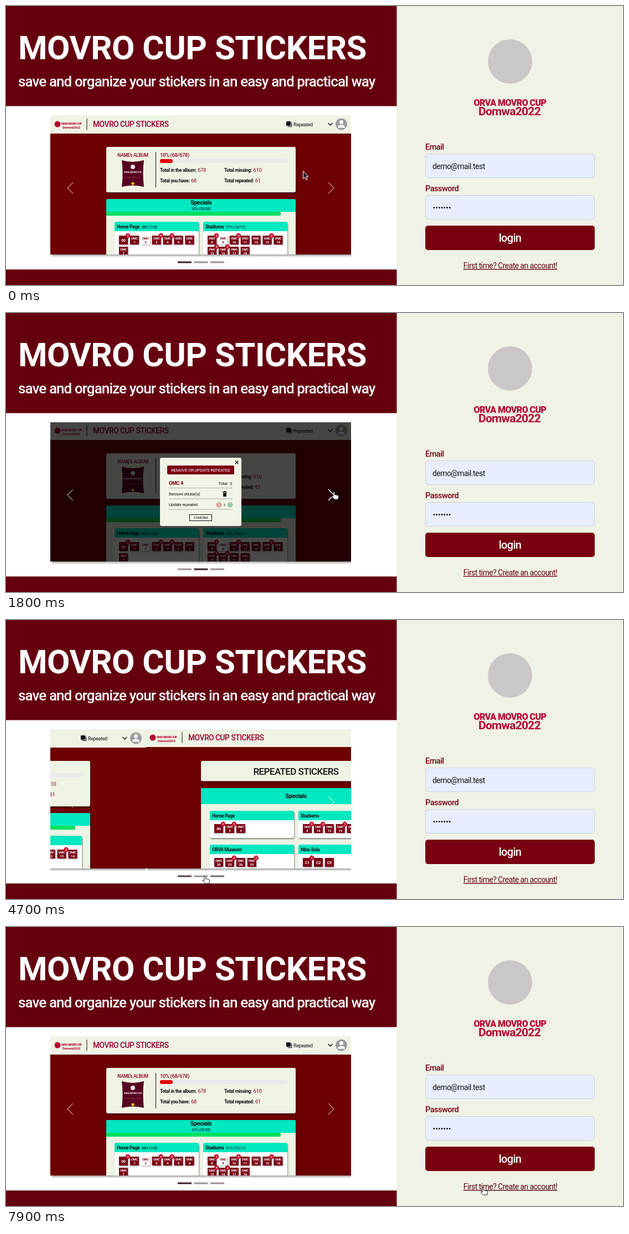
Write an HTML page that moves like this. It is 1114x503 px and loops after 8000 ms.

```html
<!DOCTYPE html>
<html lang="en">
<head>
<meta charset="utf-8">
<title>Sticker album login</title>
<style>
  html, body { margin: 0; width: 100%; height: 100%; overflow: hidden; background: #f0f2e6; }
  svg { display: block; }
  text { font-family: Roboto, "Open Sans", sans-serif; letter-spacing: -.035em; white-space: pre; }
  .card { filter: drop-shadow(1px 2px 1px rgba(0, 0, 0, .45)); }
  .low { filter: drop-shadow(1px 1px 1px rgba(0, 0, 0, .4)); }
</style>
</head>
<body>
<svg id="stage" width="1114" height="503" viewBox="0 0 1114 503"></svg>
<script>
const LOOP = 8000, WIDTH = 543;
const WINE = '#65000f', BODY = '#6d0000', CREAM = '#eef3e4', TEAL = '#00e8c0',
      ROSE = '#8e0026', LOGO = '#b8002e', STICKER = '#7a0014', BUTTON = '#780010';
const BRAND = 'MOVRO CUP STICKERS';

// Drawing helpers, all returning SVG markup
const text = (x, y, s, size, fill = '#111', weight = 400, anchor = 'start', extra = '') =>
  `<text x="${x}" y="${y}" font-size="${size}" fill="${fill}" font-weight="${weight}" text-anchor="${anchor}" ${extra}>${s}</text>`;
const mid = (x, y, s, size, fill, weight, extra) => text(x, y, s, size, fill, weight, 'middle', extra);
const rect = (x, y, w, h, fill, r = 0, extra = '') =>
  `<rect x="${x}" y="${y}" width="${w}" height="${h}" fill="${fill}" rx="${r}" ${extra}/>`;
const circle = (x, y, r, fill, extra = '') => `<circle cx="${x}" cy="${y}" r="${r}" fill="${fill}" ${extra}/>`;
const line = (d, stroke = '#111', w = 1, extra = '') =>
  `<path d="${d}" fill="none" stroke="${stroke}" stroke-width="${w}" ${extra}/>`;
const group = (id, body) => `<g id="${id}">${body}</g>`;
const clip = (h, body) =>
  `<svg x="80" y="197" width="${WIDTH}" height="${h}" viewBox="80 197 ${WIDTH} ${h}">${body}</svg>`;

function header() {
  return rect(80, 197, WIDTH, 251, BODY) + rect(80, 197, WIDTH, 33, CREAM) +
    circle(93, 213, 5.5, LOGO) +
    text(100, 214, 'ORVA MOVRO CUP', 4.5, LOGO, 800) +
    text(102, 221, 'Domwa2022', 6, LOGO, 700) +
    line('M146 203V223') + text(157, 218, BRAND, 13.8, '#9c002c', 500) +
    rect(506, 208, 8, 8, '#111', 1) + line('M508.5 217.5H515.5V210', '#111', 1.2) +
    text(519, 217, 'Repeated', 8.9) + line('M581.5 211L585.5 215L589.5 211', '#111', 1.4) +
    circle(605.5, 213, 10.5, '#9c9a9f') + circle(605.5, 209.5, 3.4, '#fff') +
    '<path d="M599 219.5Q599 214.5 605.5 214.5T612 219.5Z" fill="#fff"/>';
}

function sticker(cx, y, label, badge, missing) {
  const ink = missing ? STICKER : '#fff';
  const word = isNaN(label) || label === '00'
    ? mid(cx, y + 10.5, label, 7, ink, 700)
    : mid(cx, y + 7, 'OMC', 5.6, ink, 700) + mid(cx, y + 14, label, 6.2, ink, 700);
  return rect(cx - 8, y, 16, 16, missing ? '#fff' : STICKER, 0, 'class="low"') + word +
    (badge ? circle(cx + 8, y, 4.4, '#c8102e') + mid(cx + 8, y + 2, badge, 5.5, '#fff', 500) : '');
}

// Items read "label", "label:badge" or "label-" when missing; seven to a row
function panel(x, y, h, title, note, items) {
  const cells = items.split(' ').map((item, i) => {
    const [label, badge] = item.replace('-', '').split(':');
    return sticker(x + 16 + i % 7 * 19.9, y + 25 + (i / 7 | 0) * 20 - (h < 50 ? 1 : 0), label, badge, item.endsWith('-'));
  });
  return `<g class="card">${rect(x, y, 152, h, '#fff', 3)}</g>` +
    `<path d="M${x} ${y + 17}V${y + 3}q0 -3 3 -3H${x + 149}q3 0 3 3V${y + 17}Z" fill="${TEAL}"/>` +
    `<text x="${x + 4}" y="${y + 12}" font-size="8.4" font-weight="700" fill="#111">${title}` +
    `<tspan dx="4" font-size="7" font-weight="400">${note}</tspan></text>` + cells.join('');
}

const stat = (x, y, label, n) =>
  `<text x="${x}" y="${y}" font-size="8.6" font-weight="700" fill="#111">${label}` +
  `<tspan dx="2.5" font-size="9.4" font-weight="400" fill="${ROSE}">${n}</tspan></text>`;

function home() {
  return header() +
    rect(181, 254, 342, 82, CREAM, 3, 'class="card"') +
    mid(229, 272, 'NAME’s ALBUM', 8.35, ROSE, 500) +
    '<path d="M209 278Q229 284 249 278Q246 302 249 326Q229 321 209 326Q212 302 209 278Z" fill="#560322"/>' +
    circle(229, 290, 4, '#e8dfe2') + mid(229, 301, 'ORVA MOVRO CUP', 4, '#fff', 700) +
    line('M214 309H244', '#9a3a52') + circle(229, 320, 2.6, '#f0d000') +
    line('M270.5 263V327') +
    text(278, 272, '10% (68/678)', 9.4, ROSE, 500) +
    rect(278, 276, 230, 7, '#e7e9ec', 3) + rect(278, 276, 23, 7, '#e30505', 3) +
    stat(278, 299, 'Total in the album:', 678) + stat(394, 299, 'Total missing:', 610) +
    stat(278, 318, 'Total you have:', 68) + stat(394, 318, 'Total repeated:', 61) +
    rect(181, 348, 342, 110, CREAM, 3, 'class="card"') +
    `<path d="M181 371V351q0 -3 3 -3H520q3 0 3 3V371Z" fill="${TEAL}"/>` +
    rect(181, 371, 315, 7, '#00e060', 2) +
    mid(352, 358, 'Specials', 10.8, '#111', 700) + mid(352, 368, '92% (35/38)', 6.7) +
    panel(196, 389, 70, 'Home Page', '88% (7/8)', '00:3 1 2- 3:4 4:2 5 6 7') +
    panel(356, 389, 70, 'Stadiums', '91% (10/11)', '8:3 9- 10:4 11 12 13:2 14 15:4 16:2 17 18');
}

function dialog() {
  const red = '#c8102e', green = '#0a8a3a', rule = y => line(`M294 ${y}H409`, '#999', .8);
  return `<g transform="translate(0 -1)">${home()}</g>` +
    rect(80, 197, WIDTH, 251, '#000', 0, 'opacity=".71"') +
    rect(278, 261, 147, 123, '#f1f4e6', 3) +
    line('M414 266.5L419.5 272M419.5 266.5L414 272', '#111', 1.4) +
    rect(291, 275, 121, 16, STICKER, 2) + mid(351.5, 286, 'REMOVE OR UPDATE REPEATED', 7.85, '#fff') +
    text(294, 310, 'OMC 4', 9, STICKER, 700) + text(408, 309.5, 'Total:  3', 7.6, '#111', 400, 'end') + rule(315.5) +
    text(294, 328.5, 'Remove sticker(s)', 7.6) +
    '<path d="M391 322h2.5v-1h3v1h2.5v1.5h-8zM391.8 324.5h6.4l-.5 6.5h-5.4z" fill="#111"/>' + rule(335) +
    text(294, 348, 'Update repeated', 7.6) +
    circle(384.5, 346, 3.8, 'none', `stroke="${red}"`) + line('M382.5 346H386.5', red) +
    mid(394.5, 349, '1', 8) +
    circle(404.5, 346, 3.8, 'none', `stroke="${green}"`) + line('M402.5 346H406.5M404.5 344V348', green) +
    rule(354) + rect(331.5, 363.5, 40, 11, 'none', 0, 'stroke="#111"') + mid(351.5, 371.3, 'CONFIRM', 6.2);
}

function repeated() {
  return `<g transform="translate(0 -1)">${header()}</g>` +
    rect(180, 254, 343, 36.5, CREAM, 3, 'class="card"') + mid(351.5, 279, 'REPEATED STICKERS', 17, '#111', 500) +
    rect(180, 303, 343, 155, CREAM, 3, 'class="card"') +
    `<path d="M180 332V306q0 -3 3 -3H520q3 0 3 3V332Z" fill="${TEAL}"/>` +
    mid(351.5, 321, 'Specials', 10.8, '#111', 700) +
    panel(196, 344, 49, 'Home Page', '', '00:2 3:3 4') +
    panel(356, 344, 49, 'Stadiums', '', '8:2 10:3 13 15:1 16') +
    panel(196, 405, 49, 'ORVA Museum', '', '20 25:3 26 29:2') +
    panel(356, 405, 49, 'Mira-Sola', '', 'C1:1 C2 C5');
}

// A slide carries its own shadow along its lower edge
const slide = (draw, i) => group('slide' + i,
  rect(83, 448, 540, 5, 'url(#fade)') + clip(251, rect(80, 197, WIDTH, 251, BODY) + draw()));

const box = (y, fill) => rect(757.5, y + .5, 305, 43, fill, 5, 'stroke="#cdd2da"');
const hint = (y, s) => text(770, y + 28, s, 17.2, '#d6d6d8');
const field = (y, label, placeholder) =>
  text(757, y - 7, label, 14.5, '#780014', 500) + box(y, '#fff') + hint(y, placeholder);
const button = (y, s) => rect(757, y, 306, 44, BUTTON, 5) + mid(910, y + 29, s, 20, '#fff', 500);
const link = (y, s) => mid(910.5, y, s, 13.85, '#680010', 400, 'class="link" text-decoration="underline"');

// Browser autofill over the email and password boxes
function filled(emailY, passY) {
  let dots = '';
  for (let i = 0; i < 7; i++) dots += circle(773 + i * 4.7, passY + 22.5, 1.5, '#111');
  return `<g class="filled">${box(emailY, '#e8eeff')}${text(770, emailY + 27.5, 'demo@mail.test', 13.9)}` +
    `${box(passY, '#e8eeff')}${dots}</g>`;
}

const login = circle(910, 100, 40, '#cbc7c7') +
  mid(910, 180, 'ORVA MOVRO CUP', 16, LOGO, 800) + mid(909, 197, 'Domwa2022', 21, LOGO, 700) +
  field(266, 'Email', 'email') + field(341, 'Password', 'password') + filled(266, 341) +
  button(396, 'login') + link(473, 'First time? Create an account!');

const signup = field(43, 'Username', 'username') + field(119, 'Email', 'email') +
  field(194, 'Password', 'password') + filled(119, 194) +
  field(269, 'Confirm password', 'confirm password') + field(344, 'Picture url (optional)', 'picture url') +
  button(399, 'sign up') + link(476, 'already have an account? go to login');

const stage = document.getElementById('stage');
stage.innerHTML =
  '<linearGradient id="fade" x2="0" y2="1"><stop stop-opacity=".38"/><stop offset="1" stop-opacity="0"/></linearGradient>' +
  rect(0, 0, 706, 503, WINE) + rect(0, 180.5, 706, 294.5, '#fff') + rect(705.5, 0, 408.5, 503, '#f0f2e6') +
  text(22, 95.5, BRAND, 60, '#fff', 700, 'start', 'style="letter-spacing:-.008em"') +
  text(22, 145, 'save and organize your stickers in an easy and practical way', 26, '#fff', 500) +
  clip(257, [home, dialog, repeated].map(slide).join('')) +
  line('M121 318L111 328L121 338', '#fff', 1.5, 'opacity=".5"') +
  line('M582 318L592 328L582 338', '#fff', 1.5, 'id="next"') +
  [310, 339.5, 369].map((x, i) => rect(x, 460.5, 25, 3, '#3c2029', 0, `id="mark${i}"`)).join('') +
  group('login', login) + group('signup', signup) +
  group('arrow', '<path d="M.5 .5V14.5L3.6 11.6L5.8 16.5L8.2 15.5L6 10.8H10Z" fill="#222" stroke="#fff"/>') +
  group('hand', '<path d="M4 1.7a1.3 1.3 0 0 1 2.6 0V5.5L12 6.7Q13.7 7.2 13.5 9L12.6 14H5.8L1 8.8Q1.6 6.9 4 8.5Z" fill="#fff" stroke="#222"/>');

const $ = id => document.getElementById(id);
const links = stage.querySelectorAll('.link'), fills = stage.querySelectorAll('.filled');
const show = (el, on) => el.setAttribute('visibility', on ? 'visible' : 'hidden');

// Pointer track: time, x, y, hand
const pointer = [
  [0, 536, 297, 0], [100, 562, 345, 0], [200, 608, 430, 0], [300, 603, 375, 0], [400, 588, 322, 0],
  [600, 587, 322, 1], [3700, 581, 341, 1], [3800, 540, 378, 0], [3900, 462, 421, 0],
  [4000, 385, 447, 0], [4100, 330, 458, 1], [4200, 310, 459, 1], [4700, 354, 461, 1],
  [5000, 689, 481, 0], [5200, 806, 480, 0], [5400, 846, 472, 1], [5500, 854, 469, 1], [7900, 856, 469, 1]
];
const ticks = [...pointer.map(p => p[0]), 700, 1300, 1400, 1500, 1600, 1700, 1800, 3200, 4500, 6300, 6500, 7400, 7700];

// Cubic Bézier timing, solved by bisection
function bezier(x1, y1, x2, y2) {
  const at = (a, b, u) => 3 * a * u * (1 - u) ** 2 + 3 * b * u * u * (1 - u) + u ** 3;
  return x => {
    if (x <= 0) return 0;
    if (x >= 1) return 1;
    let lo = 0, hi = 1;
    for (let i = 0; i < 24; i++) {
      const u = (lo + hi) / 2;
      if (at(x1, x2, u) < x) lo = u; else hi = u;
    }
    return at(y1, y2, lo);
  };
}
const slideEase = bezier(.42, 0, .58, 1), fadeEase = bezier(.25, .1, .25, 1);

function render(t) {
  const x = [0, WIDTH, WIDTH], lit = [0, 0, 0];
  if (t < 3200) {
    const p = (t - 1184) / 600, k = slideEase(p), f = fadeEase(p);
    x[0] = -WIDTH * k; x[1] = WIDTH * (1 - k);
    lit[0] = 1 - f; lit[1] = f;
  } else {
    const p = (t - 4466) / 600, k = slideEase(p), f = fadeEase(p);
    x[0] = -WIDTH * (1 - k); x[2] = WIDTH * k;
    lit[0] = f; lit[2] = 1 - f;
  }
  x.forEach((v, i) => {
    $('slide' + i).setAttribute('transform', `translate(${Math.round(v)} 0)`);
    $('mark' + i).setAttribute('opacity', .5 + lit[i] / 2);
  });

  $('next').setAttribute('opacity', t >= 700 && t < 3800 ? 1 : t >= 600 && t < 700 ? .8 : .5);

  const joining = t >= 6300 && t < 7400;
  $('login').style.display = joining ? 'none' : '';
  $('signup').style.display = joining ? '' : 'none';
  const empty = t >= 6300 && t < 6500 || t >= 7400 && t < 7700;
  fills.forEach(el => show(el, !empty));
  links.forEach(el => el.setAttribute('fill', t >= 5400 ? '#520010' : '#680010'));

  const [, px, py, hand] = pointer.filter(p => p[0] <= t).pop();
  for (const id of ['arrow', 'hand']) {
    $(id).setAttribute('transform', `translate(${px} ${py})`);
    show($(id), (id === 'hand') === !!hand);
  }
}

let shown = -1;
function frame() {
  const now = performance.now() % LOOP;
  const t = Math.max(...ticks.filter(v => v <= now));
  if (t !== shown) render(shown = t);
  requestAnimationFrame(frame);
}
frame();
</script>
</body>
</html>
```
